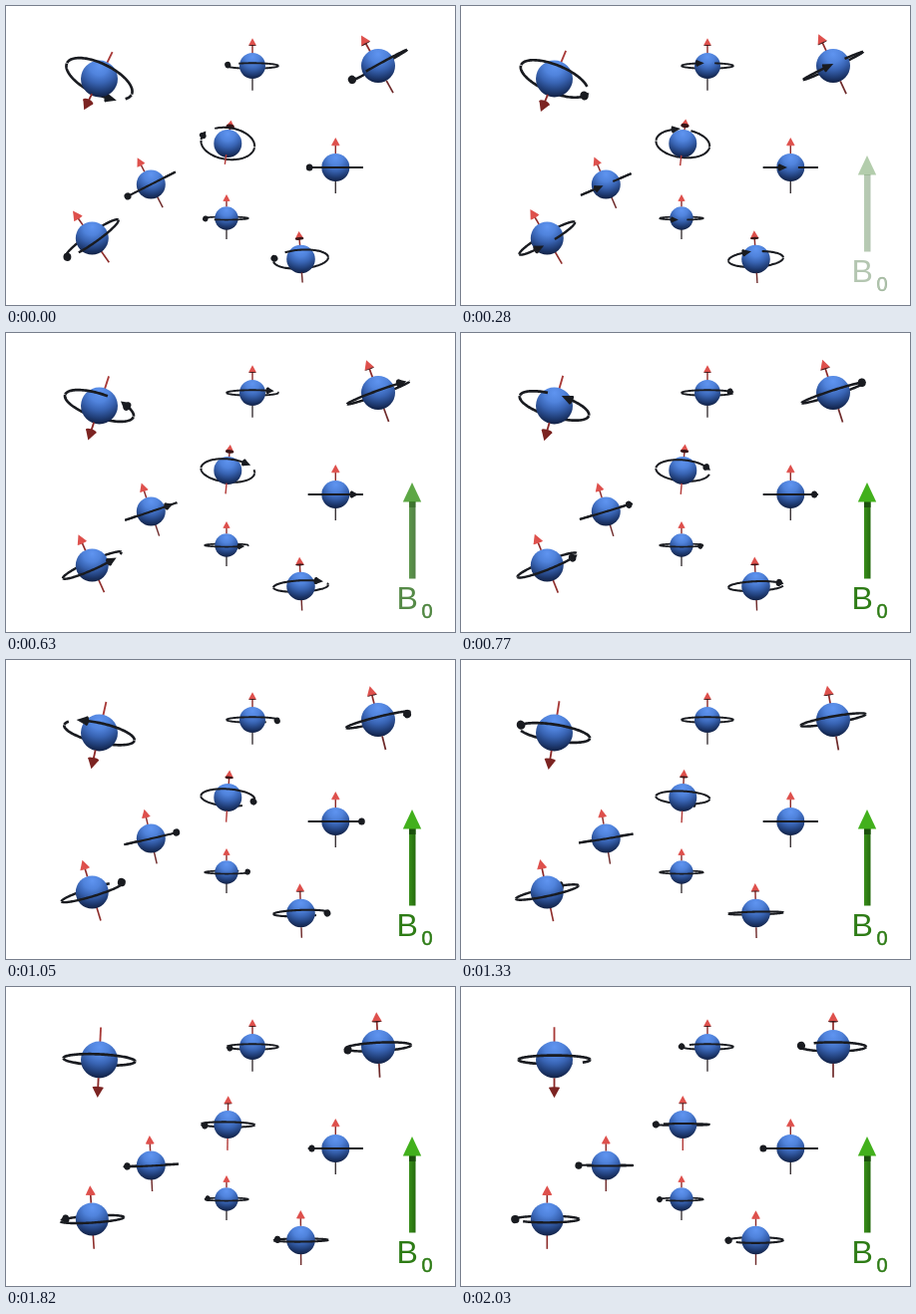
An HTML page with a canvas that plays this animation: 450x300 px, repeating every 2.1 s.

```html
<!DOCTYPE html>
<html lang="en">
<head>
<meta charset="utf-8">
<title>Spins aligning in a magnetic field</title>
<style>
html, body { margin: 0; width: 100%; height: 100%; overflow: hidden; background: #fff; }
canvas { display: block; width: 450px; height: 300px; }
</style>
</head>
<body>
<canvas id="stage" width="450" height="300"></canvas>
<script>
const ctx = document.getElementById('stage').getContext('2d');
const LOOP = 2100, STEP = 70, LAST = 29;
const RAD = Math.PI / 180;
const INK = '#191b20';

// lean: starting tilt on screen; pitch: tilt towards the viewer, start and end;
// phase: starting angle of the ring's arrowhead
const spins = [
  { x: 93.5, y: 73, r: 18.5, ring: 36, lean: 26, pitch: [25, 7], phase: -58, tip: 38.5, tail: 33, end: '#a83a38', down: true },
  { x: 247, y: 60, r: 13, ring: 26, lean: 0, pitch: [6, 6], phase: 154, tip: 28, tail: 25, end: '#3b3437' },
  { x: 373, y: 60, r: 17, ring: 33, lean: -29, pitch: [2, 8], phase: 146, tip: 35, tail: 31, end: '#6e2a2a' },
  { x: 222.3, y: 138, r: 14, ring: 27, lean: 8, pitch: [36, 2], phase: 156, tip: 29, tail: 26, end: '#b23a38' },
  { x: 145.3, y: 179, r: 14.5, ring: 27.5, lean: -27, pitch: [0, -1], phase: 154, tip: 30, tail: 26, end: '#6e2a2a' },
  { x: 330.3, y: 162, r: 14, ring: 27.5, lean: 0, pitch: [0, 0], phase: 154, tip: 30, tail: 26, end: '#3b3437' },
  { x: 86.3, y: 233, r: 16.5, ring: 32, lean: -35, pitch: [-9, -6], phase: 159, tip: 34, tail: 30, end: '#8f2f2c' },
  { x: 221, y: 213, r: 11.7, ring: 22, lean: 0, pitch: [-4, -4], phase: 156, tip: 24, tail: 21, end: '#3b3437' },
  { x: 295.5, y: 254, r: 14.3, ring: 27.5, lean: -4, pitch: [20, -6], phase: 156, tip: 30, tail: 25, end: '#6e2a2a' }
];

const mix = (a, b, k) => a + (b - a) * k;
const clamp = v => Math.max(0, Math.min(1, v));
const blend = (a, b, k) => `rgb(${a.map((v, i) => Math.round(mix(v, b[i], k)))})`;

function line(x1, y1, x2, y2, color, width) {
  ctx.strokeStyle = color;
  ctx.lineWidth = width;
  ctx.beginPath();
  ctx.moveTo(x1, y1);
  ctx.lineTo(x2, y2);
  ctx.stroke();
}

function triangle(x1, y1, x2, y2, x3, y3, color) {
  ctx.fillStyle = color;
  ctx.beginPath();
  ctx.moveTo(x1, y1);
  ctx.lineTo(x2, y2);
  ctx.lineTo(x3, y3);
  ctx.fill();
}

function ellipse(x, y, rx, ry, color) {
  ctx.fillStyle = color;
  ctx.beginPath();
  ctx.ellipse(x, y, rx, ry, 0, 0, 7);
  ctx.fill();
}

// Lit from above, nearly black underneath.
function sphere(r) {
  const g = ctx.createRadialGradient(0, -r * .7, 0, 0, -r * .7, r * 1.72);
  g.addColorStop(0, '#5f94f0');
  g.addColorStop(.3, '#5083dc');
  g.addColorStop(.55, '#3863b2');
  g.addColorStop(.8, '#203d76');
  g.addColorStop(1, '#101e40');
  ellipse(0, 0, r, r, g);
}

// Half of the axis; dir is -1 for the upper end and 1 for the lower one.
function axisEnd(s, dir, near, sinP, cosP) {
  const from = near ? dir * s.r * cosP : 0;
  const w = Math.max(1.4, s.r * .1);
  const isHead = (dir > 0) === !!s.down;
  if (!isHead) {
    line(0, from, 0, dir * s.tail * cosP, s.end, w);
    return;
  }
  const size = s.r * .56, half = s.r * .3;
  const tip = dir * s.tip * cosP;
  const base = tip - dir * size * cosP;
  const squash = Math.max(.5, half * Math.abs(sinP));
  const side = s.down ? '#7c2422' : '#de504c';
  line(0, from, 0, base, '#8c2a29', w);
  if (near) ellipse(0, base, half, squash, side);
  triangle(-half, base, half, base, 0, tip, side);
  if (!near) ellipse(0, base, half, squash, '#3a1517');
}

function ringArc(s, sinP, start, end, front) {
  const n = 120;
  let open = false;
  ctx.beginPath();
  for (let i = 0; i <= n; i++) {
    const a = mix(start, end, i / n) * RAD;
    if ((Math.sin(a) >= -.01) !== front) { open = false; continue; }
    const x = s.ring * Math.cos(a), y = -s.ring * sinP * Math.sin(a);
    open ? ctx.lineTo(x, y) : ctx.moveTo(x, y);
    open = true;
  }
  ctx.strokeStyle = INK;
  ctx.lineWidth = s.r * .145;
  ctx.stroke();
}

function ringHead(s, sinP, angle, turn) {
  const a = angle * RAD - turn * .14;
  const x = s.ring * Math.cos(a), y = -s.ring * sinP * Math.sin(a);
  const tx = -turn * Math.sin(a), ty = -turn * sinP * Math.cos(a);
  const w = s.r * .25, h = s.r * .62;
  const flat = Math.hypot(tx, ty) || 1e-6;
  ctx.save();
  ctx.translate(x, y);
  ctx.rotate(Math.atan2(ty, tx));
  triangle(0, -w, 0, w, h * flat, 0, INK);
  ellipse(0, 0, Math.max(.6, w * Math.sqrt(Math.max(0, 1 - flat * flat))), w, INK);
  ctx.restore();
}

function drawSpin(s, n) {
  const k = n / LAST;
  const pitch = mix(s.pitch[0], s.pitch[1], k) * RAD;
  const lean = s.lean * (1 - k) * RAD;
  const sinP = Math.sin(pitch), cosP = Math.cos(pitch);
  const turn = s.down ? 1 : -1;
  const angle = s.phase + turn * 360 * n * STEP / LOOP;
  const tail = angle + turn * (32 - 360), neck = angle - turn * 8;
  const headFront = Math.sin(angle * RAD) >= 0;
  const nearEnd = sinP > 0 ? 1 : -1;

  ctx.save();
  ctx.translate(s.x, s.y);
  ctx.rotate(lean);
  axisEnd(s, -nearEnd, false, sinP, cosP);
  ringArc(s, sinP, tail, neck, false);
  if (!headFront) ringHead(s, sinP, angle, turn);
  ctx.rotate(-lean);
  sphere(s.r);
  ctx.rotate(lean);
  axisEnd(s, nearEnd, true, sinP, cosP);
  ringArc(s, sinP, tail, neck, true);
  if (headFront) ringHead(s, sinP, angle, turn);
  ctx.restore();
}

function drawField(n) {
  const glow = clamp((n - 7) / 4);
  const fade = clamp(n / 11);
  ctx.save();
  ctx.globalAlpha = fade;
  const g = ctx.createLinearGradient(404, 0, 410.5, 0);
  g.addColorStop(0, blend([60, 115, 48], [58, 143, 28], glow));
  g.addColorStop(1, blend([48, 95, 40], [35, 106, 12], glow));
  ctx.fillStyle = g;
  ctx.fillRect(404, 169, 6.5, 77.5);
  ctx.globalAlpha = fade * glow;
  ctx.fillStyle = '#1b500d';
  ctx.fillRect(404, 169, 6.5, 6);
  ctx.globalAlpha = fade;
  triangle(407, 150, 397.8, 169.5, 416.2, 169.5, blend([47, 119, 28], [66, 176, 28], glow));
  ctx.fillStyle = ctx.strokeStyle = blend([50, 100, 40], [46, 124, 22], glow);
  ctx.lineWidth = .5;
  ctx.font = '32px "Liberation Sans", Arial, sans-serif';
  ctx.fillText('B', 391.5, 277);
  ctx.font = '20px "Liberation Sans", Arial, sans-serif';
  ctx.fillText('0', 416.5, 285.5);
  ctx.strokeText('0', 416.5, 285.5);
  ctx.restore();
}

const began = performance.now();

function draw() {
  const t = Math.max(0, performance.now() - began) % LOOP;
  const n = Math.floor(t / STEP);
  ctx.fillStyle = '#fff';
  ctx.fillRect(0, 0, 450, 300);
  spins.forEach(s => drawSpin(s, n));
  drawField(n);
  requestAnimationFrame(draw);
}
draw();
</script>
</body>
</html>
```
